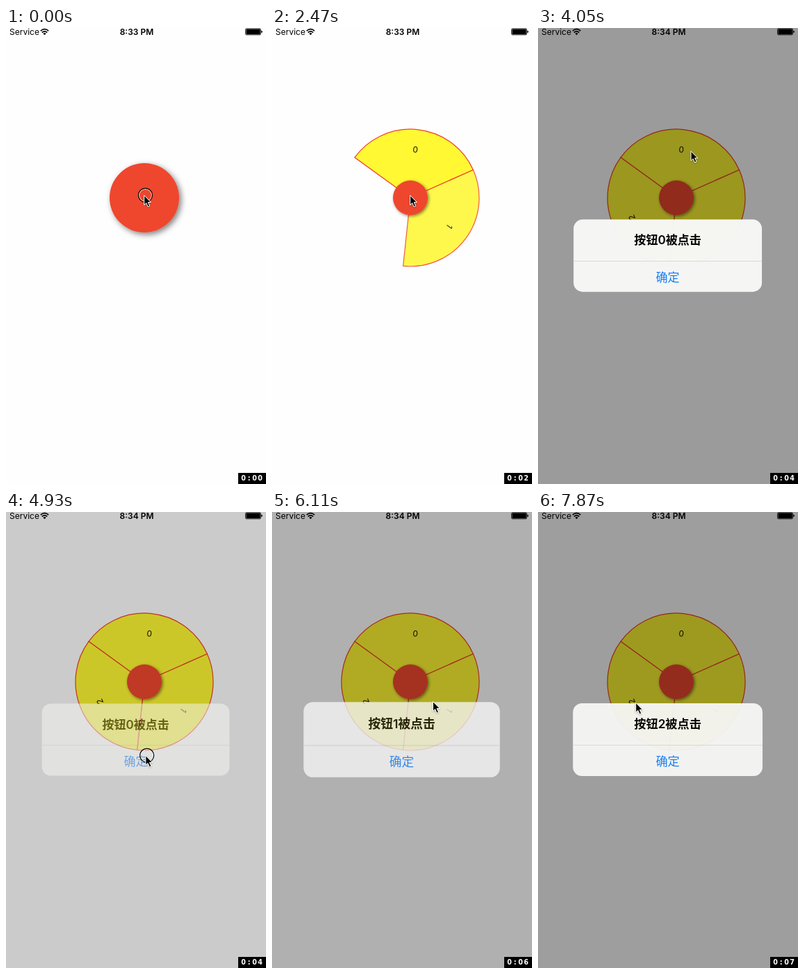
Recreate the animation shown at these times as an HTML page. Size 374 by 658 pixels, loop 8000 ms.

```html
<!DOCTYPE html>
<html lang="zh">
<head>
<meta charset="utf-8">
<title>Radial menu</title>
<style>
  html, body { margin: 0; width: 100%; height: 100%; overflow: hidden; background: #fefefe; }
  svg { display: block; width: 100vw; height: 100vh; }
  text { font-family: Inter, "Noto Sans CJK SC", "Noto Sans CJK", sans-serif; text-anchor: middle; }
  .status { font-size: 12px; }
  .sector path { fill: #fff833; stroke: #ee402a; stroke-width: 1.2; }
  .sector text { font-size: 12px; fill: #111; }
  #alert { transform-box: view-box; }
  #alert text { font-size: 17px; }
  #timer text { font: bold 9.6px "DejaVu Sans", sans-serif; fill: #fff; }
</style>
</head>
<body>
<svg viewBox="0 0 374 658" preserveAspectRatio="none">
  <defs>
    <filter id="shadow" x="-30%" y="-30%" width="160%" height="160%">
      <feDropShadow dx="3" dy="3" stdDeviation="4" flood-opacity=".5"/>
    </filter>
    <filter id="soft" x="-50%" y="-50%" width="200%" height="200%">
      <feDropShadow dx="0" dy="1" stdDeviation="1" flood-opacity=".3"/>
    </filter>
  </defs>

  <rect width="374" height="658" fill="#fefefe"/>
  <g class="status">
    <text x="5" y="10" style="text-anchor:start">Service</text>
    <g fill="none" stroke="#000" stroke-width="1.7">
      <path d="M49.8 4.2Q55.5-.8 61.2 4.2M51.8 6.5Q55.5 3.2 59.2 6.5"/>
      <path d="M53.4 7.9Q55.5 6.2 57.6 7.9L55.5 10.2Z" fill="#000" stroke="none"/>
    </g>
    <text id="clock" x="188" y="10" font-weight="600"></text>
    <rect x="344.5" y=".9" width="22" height="9" rx="1.5" fill="none" stroke="#000" stroke-width=".8"/>
    <rect x="345.4" y="1.6" width="20.3" height="7.6" rx=".8"/>
    <path d="M367.3 3.7Q369 4 369 5.4T367.3 7.1Z"/>
  </g>

  <g id="wheel" transform="translate(199 245)"></g>
  <g id="button"><circle r="50" fill="#ee462e" filter="url(#shadow)"/></g>

  <rect id="dim" width="374" height="658"/>
  <g id="alert">
    <rect x="-135" y="-52" width="270" height="104" rx="13" fill="#f7f7f6"/>
    <path d="M-135 8H135" stroke="#dcdcdc"/>
    <text id="title" y="-16" font-weight="600"></text>
    <text y="37" font-weight="500" fill="#127df5">确定</text>
  </g>

  <g id="pointer">
    <g id="ring" transform="translate(1.8 -.2)" fill="none">
      <circle r="9.1" stroke="#fff" stroke-width="1.1"/>
      <circle r="10" stroke="#000" stroke-width="1.2"/>
    </g>
    <path d="M0 0V13.8L3.1 11L5.5 16.4L8 15.3L5.6 10H9.8Z" stroke="#fff" stroke-width="1" filter="url(#soft)"/>
  </g>

  <g id="timer"><rect x="334" y="642" width="40" height="16"/></g>
</svg>

<script>
const LOOP = 8000;
const SVG = "http://www.w3.org/2000/svg";
const $ = id => document.getElementById(id);

function add(parent, tag, attrs, text = "") {
  const node = document.createElementNS(SVG, tag);
  for (const key in attrs) node.setAttribute(key, attrs[key]);
  node.textContent = text;
  return parent.appendChild(node);
}

const clamp = x => Math.min(1, Math.max(0, x));
const ease = x => (x = clamp(x), x * x * (3 - 2 * x));
const polar = (r, deg) => [r * Math.cos(deg * Math.PI / 180), r * Math.sin(deg * Math.PI / 180)];

const sectors = [0, 1, 2].map(i => {
  const start = -144 + 120 * i, middle = start + 60;
  const group = add($("wheel"), "g", { class: "sector" });
  add(group, "path", { d: `M0 0L${polar(99, start)}A99 99 0 0 1 ${polar(99, start + 120)}Z` });
  add(group, "text", { y: 4.3, transform: `translate(${polar(70, middle)}) rotate(${middle + 90})` }, i);
  return group;
});

const timerChars = [0, 1, 2, 3].map(i => add($("timer"), "text", { x: 341.7 + 8 * i, y: 653 }));

// The picture refreshes in coarse steps: [time, refresh count]
const refreshes = [[0, 0], [1180, 8], [2320, 16], [3460, 24], [3750, 26],
  [4930, 34], [5820, 40], [6990, 48], [7870, 54], [LOOP, 55]];

function stepped(t) {
  const next = refreshes.findIndex(([time]) => time > t);
  const [t0, n0] = refreshes[next - 1], [t1, n1] = refreshes[next];
  const step = (t1 - t0) / (n1 - n0);
  return t0 + Math.floor((t - t0) / step + 1e-6) * step;
}

const REVEAL = 1080, REVEAL_STEP = 780;
const alerts = [
  { show: 3780, hide: 4857 },
  { show: 5843, hide: 6883 },
  { show: 7663, hide: Infinity }
];
const taps = [0, 3750, 4930, 5820, 6840, 7720];
const home = [198.7, 241.5];
const moves = [
  { from: 2650, to: 3300, at: [220, 177.7] },
  { from: 4050, to: 4630, at: [200.9, 351.5] },
  { from: 5100, to: 5510, at: [231.5, 273.5] },
  { from: 6250, to: 6830, at: [201.7, 364] },
  { from: 7050, to: 7420, at: [140.7, 275.3] }
];

// Remaining distance of a critically damped spring
function decay(ms) {
  const x = Math.max(0, ms) * 0.02285;
  return (1 + x) * Math.exp(-x);
}

function drawAlert(t) {
  const index = alerts.findLastIndex(a => t >= a.show);
  let presence = 0, scale = 1;
  if (index >= 0) {
    const { show, hide } = alerts[index];
    const rest = decay(t - show);
    presence = t < hide ? 1 - rest : decay(t - hide);
    if (t < hide) scale += 0.2 * rest;
    $("title").textContent = `按钮${index}被点击`;
  }
  if (presence < 0.01) presence = 0;
  $("dim").setAttribute("opacity", 0.4 * presence);
  $("alert").setAttribute("opacity", presence);
  $("alert").setAttribute("transform", `translate(186.6 328.5) scale(${scale})`);
}

function drawPointer(t) {
  let [x, y] = home;
  for (const { from, to, at } of moves) {
    const k = ease((t - from) / (to - from));
    x += (at[0] - x) * k;
    y += (at[1] - y) * k;
  }
  $("pointer").setAttribute("transform", `translate(${x} ${y})`);
  const pressed = taps.some(tap => t > tap - 20 && t < tap + 100);
  $("ring").setAttribute("visibility", pressed ? "visible" : "hidden");
}

function draw(t) {
  $("clock").textContent = t < 3460 ? "8:33 PM" : "8:34 PM";
  const seconds = Math.floor((t - 885) / 1015) + 1;
  [..."0:0" + seconds].forEach((c, i) => timerChars[i].textContent = c);

  const reveal = (t - REVEAL) / REVEAL_STEP;
  sectors.forEach((sector, i) => sector.setAttribute("opacity", ease(reveal - i)));
  $("button").setAttribute("transform", `translate(199 245) scale(${1 - 0.5 * ease(reveal)})`);

  drawAlert(t);
  drawPointer(t);
}

const began = performance.now();
function tick() {
  draw(stepped((performance.now() - began) % LOOP));
  requestAnimationFrame(tick);
}
tick();
</script>
</body>
</html>
```
